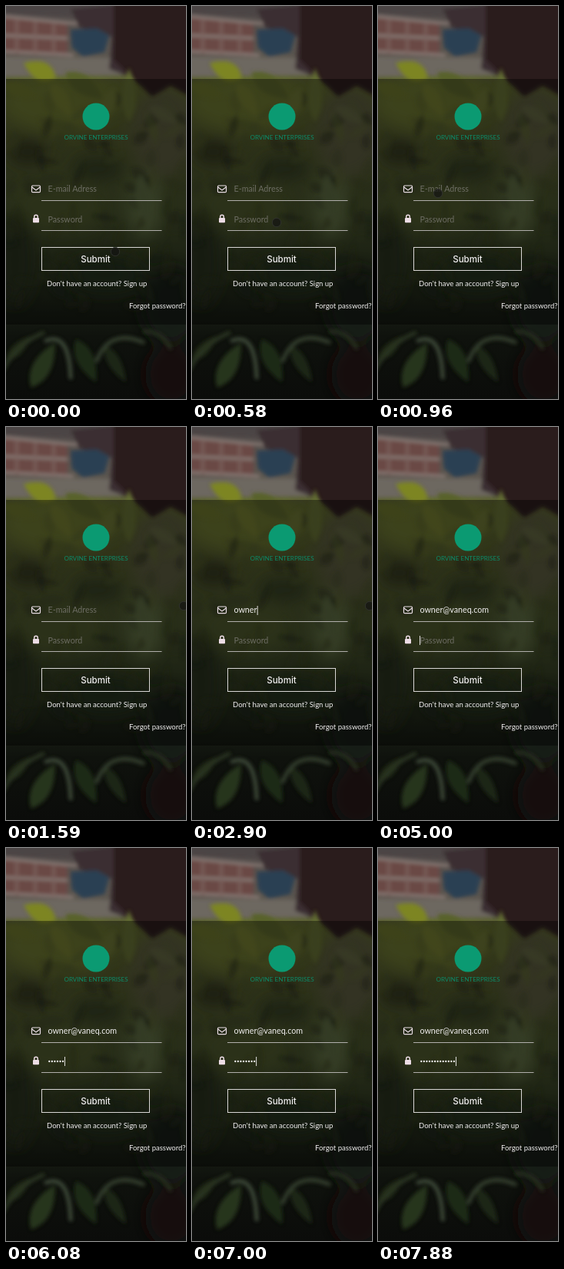
Recreate the animation shown at these times as an HTML page. Size 234x512 px, loop 8 s.

```html
<!DOCTYPE html>
<html lang="en">
<head>
<meta charset="utf-8">
<title>Login form</title>
<style>
  html, body { margin: 0; width: 100%; height: 100%; overflow: hidden; background: #15160f; }
  svg { display: block; width: 100vw; height: 100vh; }
  text { font-family: Lato, "Open Sans", sans-serif; fill: #f1eff0; white-space: pre; }
  .field { font-size: 10.7px; }
  .hint { fill: #6c6c63; }
  .link { font-size: 9.5px; }
  .submit { font: 500 11.5px Inter, "Open Sans", sans-serif; }
  .line { stroke: #b0aeab; fill: none; }
</style>
</head>
<body>
<svg viewBox="0 0 234 512" preserveAspectRatio="none">
  <defs>
    <filter id="soft" x="-20%" y="-20%" width="140%" height="140%"><feGaussianBlur stdDeviation="2.6"/></filter>
    <filter id="haze" x="-30%" y="-30%" width="160%" height="160%"><feGaussianBlur stdDeviation="10"/></filter>
    <linearGradient id="ground" x2="0" y2="1">
      <stop offset="0" stop-color="#514a49"/>
      <stop offset=".14" stop-color="#5c574f"/>
      <stop offset=".2" stop-color="#5b632d"/>
      <stop offset=".34" stop-color="#4d542b"/>
      <stop offset=".54" stop-color="#414b29"/>
      <stop offset=".66" stop-color="#2c351f"/>
      <stop offset=".78" stop-color="#171c13"/>
      <stop offset=".84" stop-color="#0f120d"/>
      <stop offset="1" stop-color="#0b0c0a"/>
    </linearGradient>
  </defs>

  <rect width="234" height="512" fill="url(#ground)"/>
  <g filter="url(#haze)">
    <ellipse cx="70" cy="125" rx="75" ry="38" fill="#656e2e"/>
    <ellipse cx="205" cy="165" rx="42" ry="58" fill="#54553a"/>
    <ellipse cx="28" cy="190" rx="24" ry="16" fill="#2d321f"/>
    <ellipse cx="120" cy="212" rx="34" ry="16" fill="#333a23"/>
    <ellipse cx="70" cy="260" rx="60" ry="34" fill="#485329"/>
    <ellipse cx="180" cy="258" rx="22" ry="44" fill="#5a6840"/>
    <ellipse cx="12" cy="330" rx="26" ry="60" fill="#272d1d"/>
    <ellipse cx="130" cy="350" rx="50" ry="24" fill="#242e1a"/>
    <ellipse cx="215" cy="390" rx="40" ry="50" fill="#191a16"/>
    <ellipse cx="215" cy="480" rx="34" ry="40" fill="#120d0d"/>
  </g>
  <g filter="url(#soft)">
    <path d="M-9 -9H150V16L-9 10Z" fill="#4b4445"/>
    <path d="M-9 14L80 22V66L-9 62Z" fill="#6a4a45"/>
    <path d="M-9 13L92 23M-9 38L80 42M-9 59L88 64" stroke="#857772" stroke-width="4"/>
    <path d="M14 18V62M38 20V62M62 23V62" stroke="#7b645e" stroke-width="3"/>
    <path d="M-9 66L150 68V90L-9 92Z" fill="#6d6760"/>
    <path d="M84 4L160 -4V92L134 82L138 40L96 28Z" fill="#3a2f30"/>
    <path d="M84 31L118 29L134 38L128 60L100 66L86 54Z" fill="#2b4152"/>
    <path d="M140 -9H243V120L214 104L190 118L166 96L140 70Z" fill="#2a1a1c"/>
  </g>
  <g id="leaves" filter="url(#soft)"></g>

  <rect y="95" width="234" height="320" fill="#000" fill-opacity=".4"/>

  <circle cx="117" cy="144" r="17.5" fill="#0b9a72"/>
  <text x="117" y="174.300" text-anchor="middle" font-size="8.100" style="fill:#0b8a68">ORVINE ENTERPRISES</text>

  <rect x="33.500" y="234" width="11" height="8.600" rx="1.200" fill="none" stroke="#e9dde4" stroke-width="1.200"/>
  <path d="M33.800 236L39 240L44.200 236" fill="none" stroke="#e9dde4" stroke-width="1.200"/>
  <rect x="35" y="276" width="8" height="6.200" rx=".9" fill="#eddde6"/>
  <path d="M36.700 276.500V274.600A2.300 2.300 0 0 1 41.300 274.600V276.500" fill="none" stroke="#eddde6" stroke-width="1.400"/>

  <path class="line" d="M46 253.500H202.500M46 292.500H202.500"/>
  <text id="mail" class="field" x="54.500" y="242.300"></text>
  <text id="passHint" class="field hint" x="54.500" y="281.500">Password</text>
  <g id="dots" fill="#f4f2f3"></g>
  <rect id="caret" width=".9" height="12" fill="#f4f2f3"/>

  <rect class="line" x="46.500" y="314.500" width="140" height="30" style="stroke:#d8d6d5"/>
  <text class="submit" x="116.500" y="334" text-anchor="middle">Submit</text>
  <text class="link" x="53" y="365">Don't have an account? Sign up</text>
  <text class="link" x="160" y="394">Forgot password?</text>

  <circle id="pointer" r="5.700" fill="#131412" fill-opacity=".72" stroke="#343532" stroke-opacity=".8"/>
</svg>
<script>
const LOOP = 8000;
const MAIL = "owner@vaneq.com";
const HINT = "E-mail Adress";
const DOT_STEP = 3.55;
const FIELD_X = 54.5;
const mailKeys = [1890, 2040, 2500, 2820, 2900, 3200, 3340, 3480, 3640, 3820, 4000, 4220, 4390, 4500, 4620];
const passKeys = [5320, 5470, 5620, 5770, 5930, 6080, 6680, 6880, 7080, 7280, 7480, 7800, 7880];
const PASS_FOCUS = 5000;

const el = id => document.getElementById(id);
const [mail, passHint, dots, caret, pointer] = ["mail", "passHint", "dots", "caret", "pointer"].map(el);

function add(parent, tag, attrs) {
  const node = document.createElementNS("http://www.w3.org/2000/svg", tag);
  for (const key in attrs) node.setAttribute(key, attrs[key]);
  parent.append(node);
}

function leaf(x, y, length, width, angle, fill, opacity = 1) {
  add(el("leaves"), "path", {
    d: `M${-length / 2} 0Q${-length / 8} ${-width} ${length / 2} 0Q${-length / 8} ${width} ${-length / 2} 0Z`,
    transform: `translate(${x} ${y}) rotate(${angle})`, fill, opacity
  });
}

function blade(d, stroke, width) {
  add(el("leaves"), "path", { d, stroke, "stroke-width": width, fill: "none", "stroke-linecap": "round" });
}

function drawLeaves() {
  let seed = 17;
  const rnd = () => (seed = seed * 16807 % 2147483647) / 2147483647;
  for (let i = 0; i < 90; i++) {
    const y = 118 + rnd() * 280;
    const x = rnd() * 234;
    const glow = 1 - (y - 118) / 330;
    const tone = 0.6 + rnd() * 0.4;
    const color = `rgb(${24 + 80 * glow * tone},${30 + 84 * glow * tone},${20 + 32 * glow * tone})`;
    leaf(x, y, 20 + rnd() * 24, 8 + rnd() * 9, rnd() * 180 - 90, rnd() < 0.35 ? "#20251a" : color, 0.4);
  }
  [
    [44, 84, 46, 24, -155, "#7d8524"], [160, 116, 70, 18, -90, "#616a30"],
    [18, 110, 48, 18, 20, "#666e2a"], [102, 104, 60, 24, 35, "#59622a"],
    [72, 122, 50, 20, 60, "#6d752f"], [134, 124, 40, 18, -70, "#666e32"],
    [180, 255, 70, 18, 80, "#56643c"], [205, 142, 44, 16, 30, "#5c5e3c"],
    [48, 468, 66, 24, -62, "#26351a"], [104, 462, 62, 22, 65, "#1f2c18"],
    [16, 446, 46, 14, -45, "#202a19"], [142, 466, 56, 16, 60, "#1b2516"]
  ].forEach(args => leaf(...args));
  blade("M52 436Q82 424 84 484", "#3c4838", 5);
  blade("M118 462Q134 420 178 438", "#35412f", 5);
  blade("M-4 474Q14 440 48 426", "#2a3623", 5);
  blade("M180 424Q204 424 214 446", "#293322", 4);
}

const ease = p => p * p * (3 - 2 * p);
const countKeys = (keys, t) => keys.filter(k => k <= t).length;

function pointerAt(t) {
  if (t < 270) return [142, 320];
  if (t < 1510) {
    const step = Math.min(12, Math.floor((t - 270) / 76.3) + 1);
    if (step > 10) return [78 + (step - 10), 244 + 3 * (step - 10)];
    const p = ease(step / 10);
    return [142 - 64 * p, 320 - 76 * p];
  }
  return t < 1590 ? [162, 240] : [231, 233];
}

function caretShown(t) {
  if (t < 1110) return false;
  return !(t >= 1510 && t < 1890) && !(t >= 6540 && t < 6680);
}

function render(t) {
  const typed = countKeys(mailKeys, t);
  const hidden = countKeys(passKeys, t);
  const inPass = t >= PASS_FOCUS;

  mail.textContent = typed ? MAIL.slice(0, typed) : HINT;
  mail.classList.toggle("hint", !typed);
  passHint.style.display = hidden ? "none" : "";
  [...dots.children].forEach((dot, i) => dot.style.display = i < hidden ? "" : "none");

  const offset = inPass ? hidden * DOT_STEP : typed ? mail.getComputedTextLength() : 0;
  caret.setAttribute("x", FIELD_X + offset + (offset ? 0.3 : -0.5));
  caret.setAttribute("y", inPass ? 272 : 233);
  caret.style.display = caretShown(t) ? "" : "none";

  const [x, y] = pointerAt(t);
  pointer.setAttribute("cx", x);
  pointer.setAttribute("cy", y);
  pointer.style.display = t < 3260 ? "" : "none";
}

drawLeaves();
passKeys.forEach((_, i) => add(dots, "circle", { cx: FIELD_X + 1.8 + i * DOT_STEP, cy: 278, r: 1.15 }));

const start = performance.now();
function frame() {
  render((performance.now() - start) % LOOP);
  requestAnimationFrame(frame);
}
frame();
</script>
</body>
</html>
```
